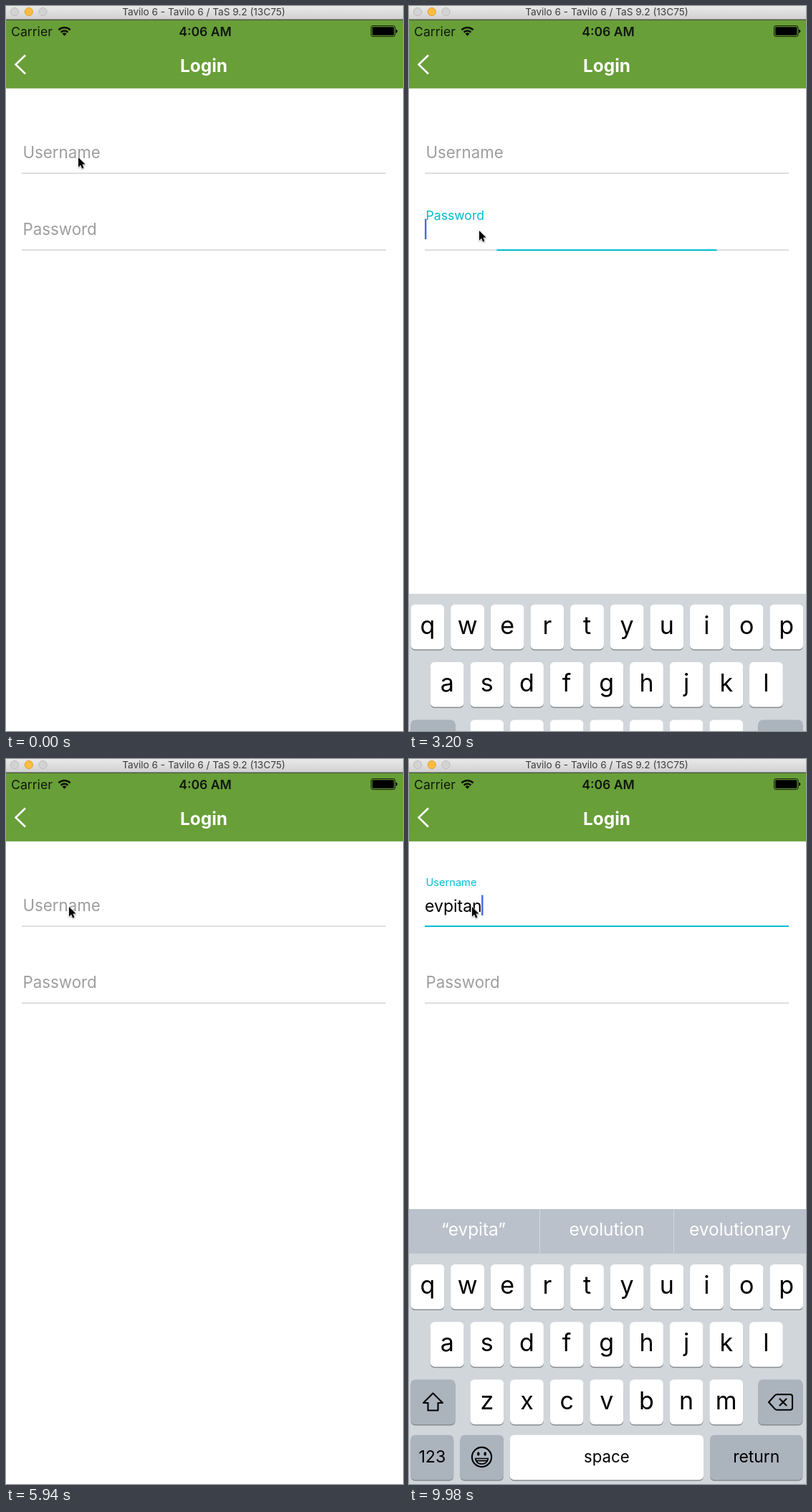
These frames come from a looping animation (554x1010 px, 10000 ms). An HTML page:

```html
<!DOCTYPE html>
<html lang="en">
<head>
<meta charset="utf-8">
<title>Login form</title>
<style>
html, body { margin: 0; width: 100%; height: 100%; overflow: hidden; background: #fff; }
svg { display: block; width: 554px; height: 1010px; font-family: Inter, "Open Sans", sans-serif; }
text { white-space: pre; }
</style>
</head>
<body>
<svg id="stage" viewBox="0 0 554 1010">
  <defs>
    <linearGradient id="chrome" x2="0" y2="1">
      <stop offset="0" stop-color="#e9e9e9"/><stop offset="1" stop-color="#d0d0d0"/>
    </linearGradient>
  </defs>
  <rect width="554" height="1010" fill="#fff"/>
  <g id="form"></g>
  <g id="board"></g>

  <rect width="554" height="19" fill="url(#chrome)"/>
  <rect y="18.6" width="554" height="1.2" fill="#1c2412"/>
  <g stroke-width="1">
    <circle cx="12" cy="8" r="5.6" fill="#d3d3d3" stroke="#bcbcbc"/>
    <circle cx="31.8" cy="8" r="5.6" fill="#fdbc40" stroke="#e0a032"/>
    <circle cx="51.5" cy="8" r="5.6" fill="#d3d3d3" stroke="#bcbcbc"/>
  </g>
  <text x="276" y="13" font-size="13.6" text-anchor="middle" fill="#3c3c3c">Tavilo 6 - Tavilo 6 / TaS 9.2 (13C75)</text>

  <rect y="19.8" width="554" height="95" fill="#689f38"/>
  <text x="7" y="41.5" font-size="17.7" fill="#10180a">Carrier</text>
  <g fill="none" stroke="#0c1207" stroke-width="2.5">
    <path d="M73.4 33.4A11.5 11.5 0 0 1 89.6 33.4"/>
    <path d="M76.6 36.6A7 7 0 0 1 86.4 36.6"/>
    <path d="M81.5 41.8L78.5 38.6A4.2 4.2 0 0 1 84.5 38.6Z" fill="#0c1207" stroke="none"/>
  </g>
  <text x="278" y="41.5" font-size="17.6" font-weight="600" text-anchor="middle" fill="#10180a">4:06 AM</text>
  <rect x="509.6" y="27.6" width="33.4" height="14.8" rx="2.4" fill="none" stroke="#0c1207"/>
  <rect x="511.2" y="29.2" width="30.2" height="11.6" rx="1.2"/>
  <path d="M544 32.5Q546.4 33 546.4 35T544 37.5Z"/>
  <path d="M27 68.5L13.5 81.5L27 94.5" fill="none" stroke="#fff" stroke-width="2.6"/>
  <text x="276" y="92" font-size="24.4" font-weight="700" text-anchor="middle" fill="#fff">Login</text>

  <path id="mouse" d="M0 0V13.4L3.1 10.5L5.2 15.4L7.5 14.4L5.4 9.6H9.6Z" stroke="#fff" stroke-width="1.1"
    paint-order="stroke" style="filter:drop-shadow(0 1px 1px rgba(0,0,0,.35))"/>
</svg>
<script>
const LOOP = 10000;
const NAME = "evpitan";
const TYPE_START = 7880, TYPE_STEP = 340;
const RISE_LAG = 17, FALL_LEAD = 45; // keyboard timing relative to the label
const CYAN = "#00bcd4", GREY = "#9e9e9e";

// field: 0 = username, 1 = password
const sessions = [
  { field: 0, on: 300, off: 1580 },
  { field: 1, on: 3087, off: 4130 },
  { field: 0, on: 6200, off: Infinity }
];

// time, x, y of the pointer
const track = [
  [0, 101, 211], [760, 101, 211], [1320, 146, 462], [2020, 146, 462],
  [2820, 98, 313], [3420, 98, 313], [3880, 145, 449], [4500, 145, 449],
  [5100, 62, 296], [5700, 88, 206], [LOOP, 88, 206]
];

const $ = id => document.getElementById(id);
const clamp = v => Math.max(0, Math.min(1, v));
const mix = (a, b, p) => a + (b - a) * p;
const smooth = v => (v = clamp(v), v * v * (3 - 2 * v));

function add(parent, tag, attrs, text) {
  const el = document.createElementNS("http://www.w3.org/2000/svg", tag);
  set(el, attrs);
  if (text) el.textContent = text;
  return parent.appendChild(el);
}
function set(el, attrs) {
  for (const k in attrs) el.setAttribute(k, attrs[k]);
}
const show = (el, on) => set(el, { visibility: on ? "visible" : "hidden" });

// keyboard slide curve: cubic-bezier(.38, .7, .125, 1)
function slide(x) {
  x = clamp(x);
  const at = (a, b, s) => 3 * (1 - s) * (1 - s) * s * a + 3 * (1 - s) * s * s * b + s * s * s;
  let lo = 0, hi = 1;
  for (let i = 0; i < 24; i++) {
    const mid = (lo + hi) / 2;
    if (at(.38, .125, mid) < x) lo = mid; else hi = mid;
  }
  return at(.7, 1, lo);
}

// form
const fields = ["Username", "Password"].map((label, i) => {
  const g = add($("form"), "g", { transform: `translate(0 ${i * 107})` });
  add(g, "rect", { x: 22, y: 232, width: 508, height: 2, fill: "#dedede" });
  return {
    line: add(g, "rect", { y: 232, height: 2, fill: CYAN }),
    label: add(g, "text", { x: 23.5 }, label),
    value: add(g, "text", { x: 22, y: 213, "font-size": 23, fill: "#000" }),
    caret: add(g, "rect", { x: 22, y: 189.5, width: 2.4, height: 28.5, fill: "#446be0" })
  };
});

// keyboard
const board = $("board");
add(board, "rect", { y: 689, width: 554, height: 321, fill: "#d1d6db" });
const bar = add(board, "g", {});
add(bar, "rect", { y: 627, width: 554, height: 62, fill: "#bac1ca" });
for (const x of [182, 369]) add(bar, "rect", { x, y: 627, width: 1, height: 62, fill: "#d3d8dd" });
const hints = [90, 276, 462].map(x =>
  add(bar, "text", { x, y: 664, "font-size": 24.4, "text-anchor": "middle", fill: "#fff" }));

function key(parent, x, y, w, label, size, dark) {
  const box = { x, width: w, height: 62.5, rx: 6 };
  add(parent, "rect", { ...box, y: y + 1.4, fill: "#888c91" });
  add(parent, "rect", { ...box, y, fill: dark ? "#abb3bd" : "#fff" });
  if (label) add(parent, "text", {
    x: x + w / 2, y: y + (size > 30 ? 41 : 38.5), "font-size": size, "text-anchor": "middle", fill: "#000"
  }, label);
}
["qwertyuiop", "asdfghjkl", "zxcvbnm"].forEach((row, r) => {
  [...row].forEach((c, i) => key(board, [2.5, 29.8, 85.4][r] + i * 55.65, 704 + r * 80.3, 46.8, c, 34));
});
key(board, 2.5, 864.6, 62, "", 0, true);
key(board, 487.4, 864.6, 62, "", 0, true);
const icon = { fill: "none", stroke: "#000", "stroke-width": 2.1, "stroke-linejoin": "round", "stroke-linecap": "round" };
add(board, "path", { ...icon, d: "M33.5 883.5L47 897H40.5V907.5H26.5V897H20Z" });
add(board, "path", { ...icon, d: "M502 896L510.5 886.6Q511.8 885.2 513.5 885.2H532Q535 885.2 535 888.2V903.8Q535 906.8 532 906.8H513.5Q511.8 906.8 510.5 905.4ZM517.5 891.5L526.5 900.5M526.5 891.5L517.5 900.5" });
key(board, 140.6, 941.8, 270.4, "space", 22.2);
key(board, 420, 941.8, 129.4, "return", 22.9, true);

const plain = add(board, "g", {}), secret = add(board, "g", {});
key(plain, 2.5, 941.8, 59.7, "123", 23.2, true);
key(plain, 71.5, 941.8, 60.5, "", 0, true);
add(plain, "circle", { ...icon, cx: 101.5, cy: 972.5, r: 13.6 });
for (const x of [96.8, 106.2]) add(plain, "ellipse", { cx: x, cy: 968, rx: 1.8, ry: 2.8 });
add(plain, "path", { ...icon, "stroke-width": 1.7, d: "M92.6 974.5H110.4Q109 982.2 101.5 982.2T92.6 974.5ZM94 977.6H109" });
key(secret, 2.5, 941.8, 129.5, ".?123", 23.2, true);

function pointer(t) {
  const i = Math.max(1, track.findIndex(p => p[0] > t));
  const [a, b] = [track[i - 1], track[i]];
  const p = smooth((t - a[0]) / (b[0] - a[0]));
  return [mix(a[1], b[1], p), mix(a[2], b[2], p)];
}

function render(t) {
  const s = sessions.filter(s => t >= s.on).pop();
  const typed = t < TYPE_START ? 0 : Math.min(NAME.length, 1 + Math.floor((t - TYPE_START) / TYPE_STEP));

  fields.forEach((f, i) => {
    const mine = s && s.field === i;
    const p = mine ? smooth((t - s.on) / 200) * (1 - smooth((t - s.off) / 200)) : 0;
    set(f.label, {
      y: mix(212, 177, p),
      "font-size": mix(22.3, 14.6, p),
      fill: mine && t < s.off ? CYAN : GREY
    });
    set(f.line, { x: 276 - 254 * p, width: 508 * p });
    f.value.textContent = i === 0 ? NAME.slice(0, typed) : "";
    const lit = mine && t < s.off - FALL_LEAD && (typed > 0 || (t - s.on) % 1000 < 600);
    show(f.caret, lit);
    set(f.caret, { x: 22 + (i === 0 && typed ? f.value.getComputedTextLength() - .6 : 0) });
  });

  const isSecret = !!s && s.field === 1;
  const up = s ? slide((t - s.on - RISE_LAG) / 400) * (1 - slide((t - s.off + FALL_LEAD) / 400)) : 0;
  show(board, up > 0);
  set(board, { transform: `translate(0 ${(isSecret ? 321 : 383) * (1 - up)})` });
  for (const [el, on] of [[bar, !isSecret], [plain, !isSecret], [secret, isSecret]])
    set(el, { display: on ? "inline" : "none" });

  const words = typed < 2
    ? ["I", "the", "I'm"]
    : [`“${NAME.slice(0, typed - 1)}”`, "evolution", "evolutionary"];
  hints.forEach((h, i) => { h.textContent = words[i]; });

  set($("mouse"), { transform: `translate(${pointer(t)})` });
}

function tick() {
  render(performance.now() % LOOP);
  requestAnimationFrame(tick);
}
tick();
</script>
</body>
</html>
```
